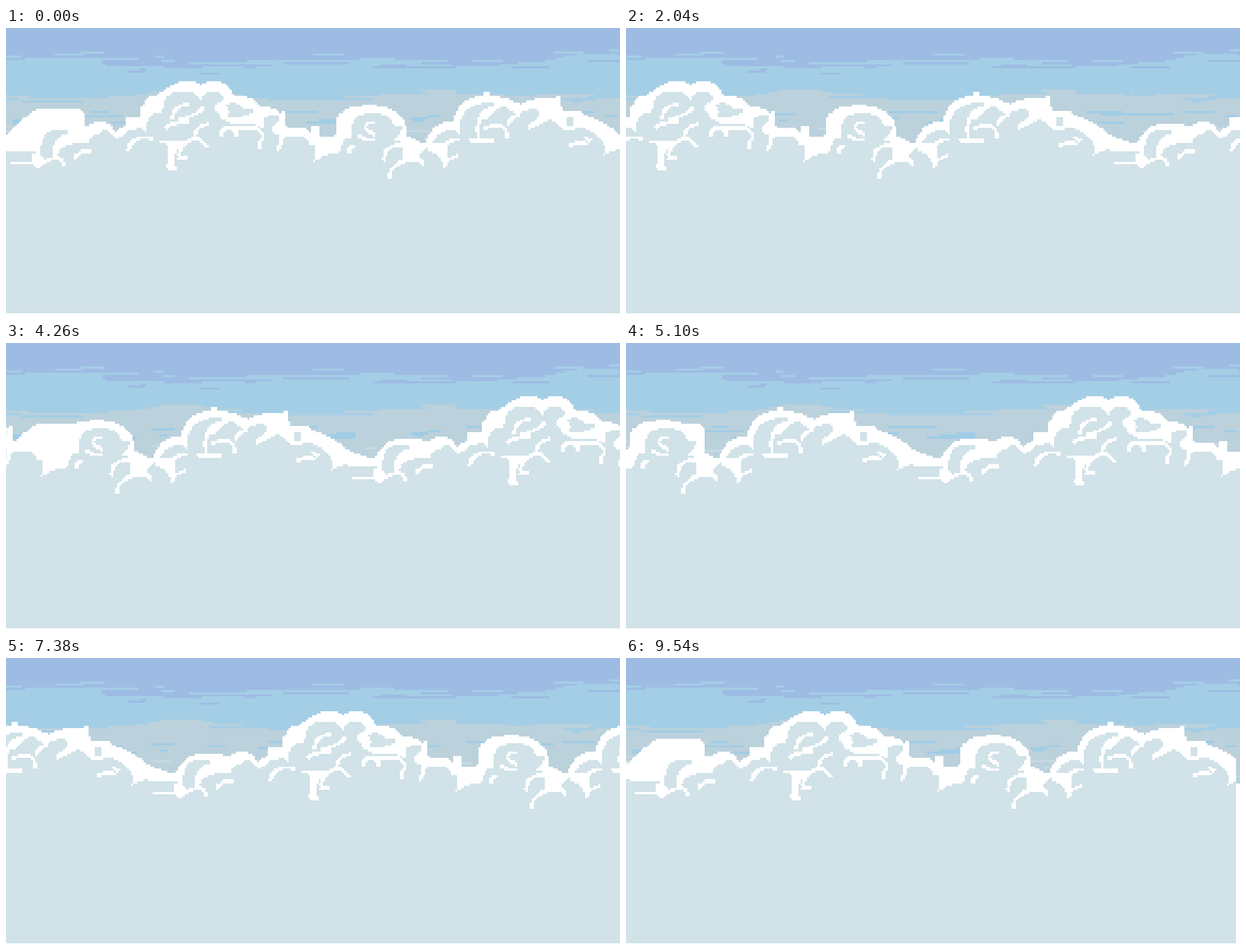
Animation of 1093 by 512 pixels, one loop 9600 ms. Source, as an HTML page with a canvas:

```html
<!DOCTYPE html>
<html lang="en">
<head>
<meta charset="utf-8">
<title>Drifting clouds</title>
<style>
html, body { margin: 0; width: 100%; height: 100%; overflow: hidden; background: #fff; }
canvas { display: block; }
</style>
</head>
<body>
<canvas id="stage" width="1093" height="512"></canvas>
<script>
const W = 1093, COLS = 288, ROWS = 135, CELL = W / COLS, HEIGHT = ROWS * CELL;
const FRAMES = 160, FRAME_MS = 60, STEP = W / FRAMES;
const WHITE = '#ffffff', PALE = '#d1e2e8';
const VIOLET = '#9ebce3', LIGHT = '#a4cee6', GREY = '#bbd1dc', BLUE = '#a0cce6', MIST = '#c6d9e3';

function makeGrid() {
  const canvas = document.createElement('canvas');
  canvas.width = COLS;
  canvas.height = ROWS;
  return canvas;
}

// Draws in stage coordinates, then snaps each cell to white, pale or clear.
function makeLayer(draw) {
  const canvas = makeGrid();
  const ctx = canvas.getContext('2d');
  ctx.scale(1 / CELL, 1 / CELL);
  draw(ctx);
  const image = ctx.getImageData(0, 0, COLS, ROWS), d = image.data;
  for (let i = 0; i < d.length; i += 4) {
    const color = d[i] > 232 ? [255, 255, 255] : [209, 226, 232];
    d.set([...color, d[i + 3] < 128 ? 0 : 255], i);
  }
  ctx.putImageData(image, 0, 0);
  return canvas;
}

function fill(ctx, color, path) {
  ctx.fillStyle = color;
  ctx.fill(new Path2D(path));
}

function hash(i, row) {
  const v = Math.sin(i * 127.1 + row * 311.7) * 43758.5453;
  return v - Math.floor(v);
}

// Noise from -1 to 1, long across and one cell high, so thresholds give streaks.
function streak(col, row) {
  const x = col / 17 + hash(7, row), i = Math.floor(x), t = x - i;
  return 2 * (hash(i, row) * (1 - t) + hash(i + 1, row) * t) - 1;
}

function skyColor(col, row) {
  if (row >= 59) return WHITE;
  const swell = Math.cos(2 * Math.PI * (col - 24) / 125);
  const noise = streak(col, row);
  if (row < 7) return VIOLET;
  if (row < 26) return row + 2.6 * swell + 5 * noise > 15.5 ? LIGHT : VIOLET;
  if (row < 37) return row - 1.3 * swell + 2.5 * noise > 31 ? GREY : LIGHT;
  if (row >= 39 && row < 45 && noise > 0.5) return BLUE;
  return row >= 44 && noise > 0.6 ? MIST : GREY;
}

function makeSky() {
  const canvas = makeGrid();
  const ctx = canvas.getContext('2d');
  for (let row = 0; row < ROWS; row++) {
    for (let col = 0; col < COLS; col++) {
      ctx.fillStyle = skyColor(col, row);
      ctx.fillRect(col, row, 1, 1);
    }
  }
  const gap = 'M0 190 L45 150 Q55 143 65 143 H127 L141 153 V512 H0Z';
  ctx.drawImage(makeLayer(layer => fill(layer, WHITE, gap)), 0, 0);
  return canvas;
}

const ridge = `M0 191 L38 205 H50 Q62 168 105 171 L148 174 Q175 154 196 187
  L212 172 V158 H226 L238 160 Q240 122 270 120 Q300 94 322 94 Q340 94 347 103
  Q355 94 372 94 Q392 95 406 120 Q440 120 456 142 Q482 140 489 152 L496 146 L499 177
  H530 L543 186 V174 H557 V193 H585 Q592 188 587 170 Q590 139 645 138 Q714 138 714 192
  L738 205 H746 Q760 165 796 166 Q806 121 851 121 V115 H861 V121 Q890 121 915 136
  Q930 124 975 125 L987 121 V136 L994 150 Q1020 140 1031 156 Q1075 170 1093 193 V509 H0Z`;

const shade = `M0 220 H48 L60 227 Q62 180 92 181 H108 L112 187 Q84 192 82 228 H92
  Q96 202 146 205 Q152 188 164 190 Q180 172 194 197 L197 201 Q216 178 243 178 L250 192
  Q246 150 278 150 Q280 112 312 112 Q342 112 347 130 Q354 112 370 112 Q390 114 386 130
  L372 138 Q372 165 410 172 H440 L460 180 V160 Q470 154 486 157 V165 L474 178 L496 196
  Q530 184 540 207 L552 212 L547 245 Q556 224 594 222 Q598 194 617 196 Q608 152 650 152
  Q690 152 690 176 L704 174 Q708 190 688 200 L757 212 Q762 183 800 182 L808 192
  Q800 133 868 133 V139 Q844 146 843 165 H855 Q868 142 890 140 L902 150 L912 156
  Q925 142 945 145 Q958 158 930 172 V182 L968 163 Q985 168 990 181 H1010
  Q1040 170 1068 212 L1061 240 Q1064 217 1093 217 V509 H0Z`;

const pockets = `M390 138 Q410 128 420 142 L445 147 Q420 166 392 157 L398 150Z
  M997 162 Q1004 157 1011 161 V172 L1004 175 L997 172Z`;

const patches = `M258 196 Q285 206 325 200 Q300 212 300 235 L303 255 H293 L284 248 L290 233 V210Z
  M708 196 L740 206 L757 200 L745 216 Q728 226 742 240 Q720 232 702 240 Q712 222 700 208Z
  M752 208 L790 203 Q780 218 790 235 L780 251 Q776 226 752 220Z
  M44 224 L60 227 L75 238 L53 253Z`;

const curls = `M6 240 H50 M68 239 Q100 222 104 247 M122 234 Q128 219 153 219
  M217 221 Q222 188 262 197 M297 164 Q294 138 327 136 M307 162 Q330 162 353 142
  M284 179 Q296 166 328 168 M335 199 Q336 172 362 171 M303 234 L324 231
  M307 228 Q314 198 342 197 L360 212 M382 194 Q382 170 410 185 V194
  M396 179 H445 Q466 190 452 203 V217 M474 182 Q504 192 482 219
  M658 168 Q620 172 657 190 M626 190 Q640 204 655 198 M612 226 V213 L621 209
  M673 238 Q670 207 706 208 M681 271 Q684 237 725 235 Q740 234 744 245
  M782 238 L805 227 M782 208 Q790 198 808 199 M841 198 Q834 150 866 143 M825 201 H870
  M851 180 Q890 160 893 198 M893 176 Q896 158 915 156
  M1003 210 Q1020 200 1036 207 M1030 194 L1041 201`;

const sky = makeSky();
const clouds = makeLayer(ctx => {
  fill(ctx, WHITE, ridge);
  fill(ctx, PALE, shade);
  fill(ctx, PALE, pockets);
  fill(ctx, WHITE, patches);
  ctx.strokeStyle = WHITE;
  ctx.lineWidth = 6.5;
  ctx.stroke(new Path2D(curls));
});

const stage = document.getElementById('stage').getContext('2d');
stage.imageSmoothingEnabled = false;

function render(now) {
  const frame = Math.floor(now / FRAME_MS) % FRAMES;
  const shift = Math.round(frame * STEP);
  const tail = W - 2 * STEP; // the repeat stops two steps short
  stage.drawImage(sky, 0, 0, W, HEIGHT);
  stage.drawImage(clouds, -shift, 0, W, HEIGHT);
  stage.drawImage(clouds, 0, 0, tail / CELL, ROWS, W - shift, 0, tail, HEIGHT);
}

const start = performance.now();
function tick() {
  render(performance.now() - start);
  requestAnimationFrame(tick);
}
tick();
</script>
</body>
</html>
```
